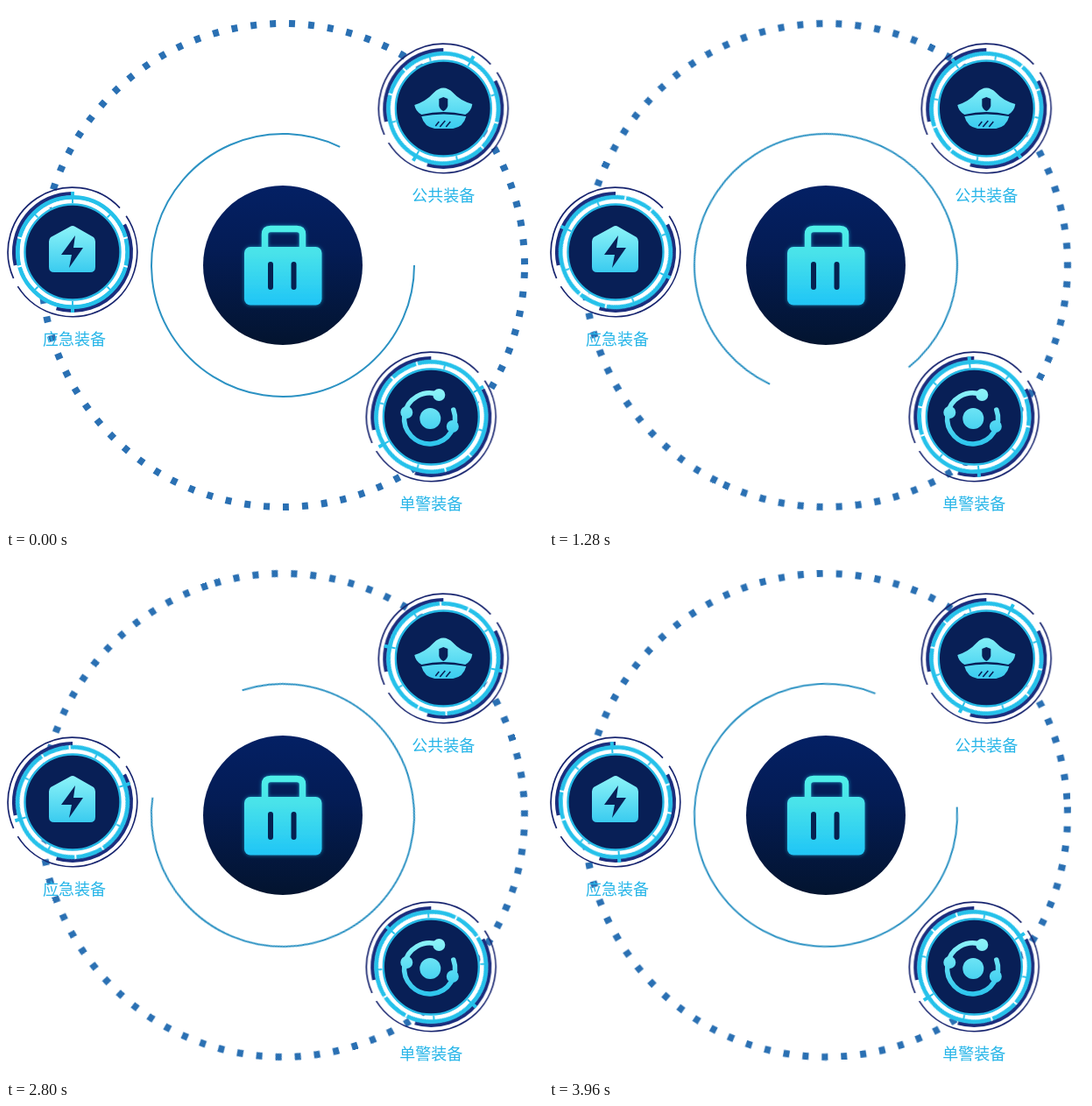
These frames come from a looping animation (613 by 596 pixels, 4000 ms). An HTML page:

```html
<!DOCTYPE html>
<html lang="zh">
<head>
<meta charset="utf-8">
<style>
html, body { margin: 0; width: 100%; height: 100%; overflow: hidden; background: #fff; }
svg { display: block; width: 613px; height: 596px; }
.spin { animation: spin 4s steps(100) infinite; }
.hub { transform-origin: 316px 296px; }
.badge .spin { transform-origin: 0 0; }
@keyframes spin { to { transform: rotate(360deg); } }
text { font: 300 18px "Noto Sans CJK SC", "Noto Sans CJK", sans-serif; fill: #27b5e8; text-anchor: middle; }
.line { fill: none; }
</style>
</head>
<body>
<svg viewBox="0 0 613 596">
  <defs>
    <linearGradient id="night" x2="0" y2="1">
      <stop stop-color="#042064"/><stop offset=".4" stop-color="#041c55"/><stop offset="1" stop-color="#03142f"/>
    </linearGradient>
    <linearGradient id="case" gradientUnits="userSpaceOnUse" x1="0" y1="251" x2="0" y2="341">
      <stop stop-color="#4ff0e8"/><stop offset=".35" stop-color="#48e2ea"/><stop offset="1" stop-color="#20c5f6"/>
    </linearGradient>
    <linearGradient id="ice" gradientUnits="userSpaceOnUse" x1="0" y1="-30" x2="0" y2="30">
      <stop stop-color="#8cf3f8"/><stop offset="1" stop-color="#2fc6ee"/>
    </linearGradient>
    <filter id="glow" x="-20%" y="-20%" width="140%" height="140%">
      <feDropShadow dx="0" dy="0" stdDeviation="2" flood-color="#27c3ee" flood-opacity=".6"/>
    </filter>

    <g id="frame" class="line">
      <g stroke="#17246f" stroke-width="1.7">
        <path id="rimA"/><path id="rimB"/>
      </g>
      <g stroke="#1c2d7d" stroke-width="4.5">
        <path id="bandA"/><path id="bandB"/>
      </g>
    </g>
    <g id="dial" class="line">
      <circle r="62.5" stroke="#25c1ea" stroke-width="5"/>
      <circle r="58.5" stroke="#fff" stroke-width="3.5"/>
      <path id="ticks" stroke="#25c1ea" stroke-width="4"/>
      <path id="bars" stroke="#25c1ea" stroke-width="2"/>
      <path id="slits" stroke="#fff" stroke-width="2"/>
    </g>
    <circle id="disc" r="54.5" fill="#081f56" stroke="#25b9e5" stroke-width="2.4"/>
  </defs>

  <circle class="line spin hub" cx="316" cy="296" r="276" stroke="#2a70b3" stroke-width="8"
          stroke-dasharray="7 15.02" stroke-dashoffset="-8"/>
  <path class="line spin hub" d="M466 296A150 150 0 1 1 381.2 160.9" stroke="#2c92c3" stroke-width="2"/>

  <circle cx="316" cy="296" r="91" fill="url(#night)"/>
  <g filter="url(#glow)">
    <path class="line" d="M295.5 277V261Q295.5 254.500 302 254.500H332Q338.500 254.500 338.500 261V277" stroke="url(#case)" stroke-width="7.500"/>
    <rect x="272" y="275" width="88.500" height="66.500" rx="7" fill="url(#case)"/>
  </g>
  <path class="line" d="M302 295V321M328.500 295V321" stroke="#052150" stroke-width="6" stroke-linecap="round"/>

  <g class="badge" transform="translate(499.3 117)">
    <use href="#frame"/>
    <g class="spin"><use href="#dial" transform="rotate(-60)"/></g>
    <use href="#disc"/>
    <path fill="url(#ice)" d="M-33 -4Q-20 -8 -11 -18Q0 -29 11 -18Q19 -9 33 -5Q32 3 25 7Q0 1 -25 7Q-32 3 -33 -4Z"/>
    <path fill="url(#ice)" d="M-25 9Q0 4 26 9Q23 21 11 23H-10Q-22 21 -25 9Z"/>
    <path fill="#081f56" d="M-5 -11L0 -13L5 -11L5 -3Q4 1 0 3Q-4 1 -5 -3Z"/>
    <path class="line" d="M-9 20L-5 15M-4 21L2 14M3 21L8 15" stroke="#081f56" stroke-width="1.5"/>
    <text y="105.500">公共装备</text>
  </g>

  <g class="badge" transform="translate(76 281)">
    <use href="#frame"/>
    <g class="spin"><use href="#dial" transform="rotate(-90)"/></g>
    <use href="#disc"/>
    <path fill="url(#ice)" d="M-3 -29Q0 -31 3 -29L24 -17Q26 -15 26 -12V17Q26 23 20 23H-21Q-27 23 -27 17V-12Q-27 -15 -25 -17Z"/>
    <path fill="#081f56" d="M3 -19L-13 3H-1L-4 18L12 -5H1Z"/>
    <text x="2" y="105.500">应急装备</text>
  </g>

  <g class="badge" transform="translate(485.300 469)">
    <use href="#frame"/>
    <g class="spin"><use href="#dial" transform="rotate(150)"/></g>
    <use href="#disc"/>
    <path class="line" d="M9 -25A29 29 0 1 0 25.500 -8" stroke="url(#ice)" stroke-width="5.500" stroke-linecap="round"/>
    <g fill="url(#ice)">
      <circle cx="-1" cy="2" r="12"/>
      <circle cx="9" cy="-25" r="7"/>
      <circle cx="-28" cy="-5" r="7"/>
      <circle cx="24.500" cy="11" r="7"/>
    </g>
    <text y="105.500">单警装备</text>
  </g>
</svg>
<script>
const point = (radius, degrees) => {
  const a = degrees * Math.PI / 180;
  return `${(radius * Math.cos(a)).toFixed(2)} ${(radius * Math.sin(a)).toFixed(2)}`;
};
const arc = (r, from, to) => `M${point(r, from)}A${r} ${r} 0 ${to - from > 180 ? 1 : 0} 1 ${point(r, to)}`;
const spokes = (inner, outer, angles) => angles.map(a => `M${point(inner, a)}L${point(outer, a)}`).join('');
const draw = (id, d) => document.getElementById(id).setAttribute('d', d);

draw('rimA', arc(73.8, -34, 148));
draw('rimB', arc(73.8, 156, 317));
draw('bandA', arc(66.8, -28, 106));
draw('bandB', arc(66.8, 167, 270));
draw('ticks', spokes(61, 69, [0, 180]));
draw('bars', spokes(56, 61, [0, 45, 135, 180, 225, 315]));
draw('slits', spokes(60, 65, [75, 105, 255, 285]));
</script>
</body>
</html>
```
